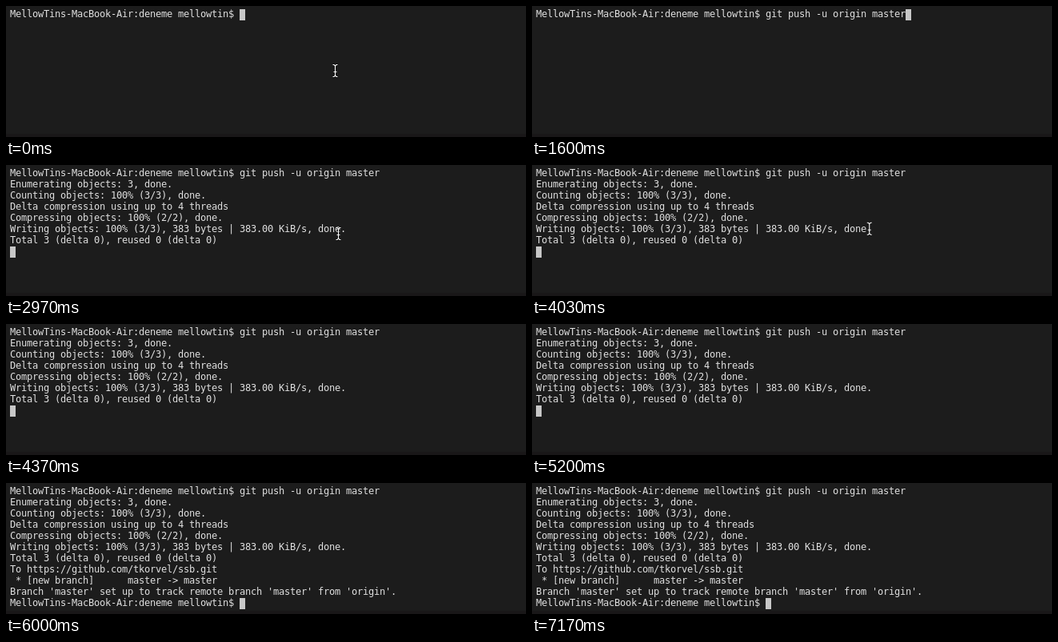
Write an HTML page that moves like this. It is 650 px wide and 164 px high and loops after 7630 ms.

```html
<!DOCTYPE html>
<html lang="en">
<head>
<meta charset="utf-8">
<title>Terminal: git push</title>
<style>
  html, body { margin: 0; width: 100%; height: 100%; overflow: hidden; background: #1c1c1c; }
  svg { display: block; width: 650px; height: 164px; }
  text { font: 12px "DejaVu Sans Mono", monospace; fill: #e0e0e0; white-space: pre; }
</style>
</head>
<body>
<svg viewBox="0 0 650 164">
  <rect width="650" height="164" fill="#1c1c1c"/>
  <rect y="160" width="650" height="4" fill="#191718"/>
  <rect id="caret" width="7" height="14" fill="#c7c7c7"/>
  <g id="rows"></g>
  <g id="mouse" fill="none">
    <path id="beam" stroke="#000" stroke-opacity=".55" stroke-width="2.4"
      d="M-3 -7.5H-1.5L0 -6L1.5 -7.5H3M0 -6V6M-3 7.5H-1.5L0 6L1.5 7.5H3M-2 1.5H2"/>
    <use href="#beam"/>
  </g>
</svg>
<script>
const LOOP = 7630, CELL = 7, LINE = 14, LEFT = 5, TOP = 4;
const PROMPT = "MellowTins-MacBook-Air:deneme mellowtin$ ";
const COMMAND = PROMPT + "git push -u origin master";
const PROGRESS = [
  "Enumerating objects: 3, done.",
  "Counting objects: 100% (3/3), done.",
  "Delta compression using up to 4 threads",
  "Compressing objects: 100% (2/2), done.",
  "Writing objects: 100% (3/3), 383 bytes | 383.00 KiB/s, done.",
  "Total 3 (delta 0), reused 0 (delta 0)"
];
const RESULT = [
  "To https://github.com/tkorvel/ssb.git",
  " * [new branch]      master -> master",
  "Branch 'master' set up to track remote branch 'master' from 'origin'."
];

const $ = id => document.getElementById(id);
const NS = "http://www.w3.org/2000/svg";

// One text element per terminal row, characters on the cell grid
const rows = Array.from({ length: 11 }, (_, i) => {
  const row = document.createElementNS(NS, "text");
  row.setAttribute("y", TOP + LINE * i + 10);
  row.setAttribute("x", Array.from({ length: 70 }, (_, c) => LEFT + CELL * c).join(" "));
  $("rows").append(row);
  return row;
});

// A white stroke over the dark outline of the pointer
const core = $("beam").cloneNode();
core.removeAttribute("id");
core.setAttribute("stroke", "#fff");
core.setAttribute("stroke-opacity", "1");
core.setAttribute("stroke-width", "1.1");
$("mouse").querySelector("use").replaceWith(core);

function screenAt(t) {
  if (t < 530) return [PROMPT];
  const lines = [COMMAND];
  if (t < 1630) return lines;
  if (t >= 2970) lines.push(...PROGRESS);
  if (t >= 5370) lines.push(...RESULT);
  lines.push(t >= 5400 ? PROMPT : "");
  return lines;
}

function mouseAt(t) {
  if (t < 1600) return [411.5, 81];
  if (t < 2670 || t >= 4370) return null;
  if (t < 4000) return [415.5, 86];
  const step = Math.floor((t - 4000 + 4) / (100 / 3)) + 1;
  const p = Math.pow(step / 12, 1.5);
  return [415.5 + 92 * p, 86 - 92 * p];
}

let shown = "";
function draw(t) {
  const lines = screenAt(t);
  const key = lines.join("\n");
  if (key !== shown) {
    shown = key;
    rows.forEach((row, i) => { row.textContent = lines[i] || ""; });
    const last = lines.length - 1;
    $("caret").setAttribute("x", LEFT + CELL * lines[last].length);
    $("caret").setAttribute("y", TOP + LINE * last);
  }
  const pos = mouseAt(t);
  $("mouse").setAttribute("visibility", pos ? "visible" : "hidden");
  if (pos) $("mouse").setAttribute("transform", `translate(${pos})`);
}

const start = performance.now();
function tick() {
  draw((performance.now() - start) % LOOP);
  requestAnimationFrame(tick);
}
draw(0);
requestAnimationFrame(tick);
</script>
</body>
</html>
```
